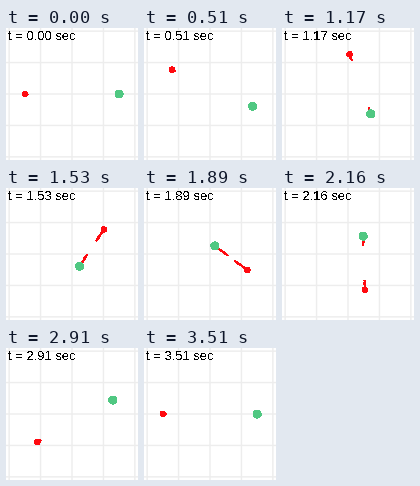
A matplotlib script for the animation above (3540 ms loop, 132 by 132 pixels).

```python
import numpy as np
import matplotlib.pyplot as plt
from matplotlib.animation import FuncAnimation
from matplotlib.patches import Circle, Polygon

SIZE, DPI = 132, 100
PT = 72 / DPI              # points per pixel
UNIT = SIZE / 4.2          # pixels per length unit
STEP, FRAMES = 0.03, 118

# two bodies of mass 1 and 2, started at their greatest distance
GM, START, SPEED = 30.0, 3.0, 2.4
CENTRE = np.array([0.5, 0.0])
AXIS = 1 / (2 / START - SPEED**2 / GM)
ECC = START / AXIS - 1
RATE = np.sqrt(GM / AXIS**3)
FORCE = 0.82
RED, GREEN = "#ff0a10", "#50c882"


def separation(t):
    """Vector from the green body to the red one (Kepler orbit)."""
    mean = RATE * t - np.pi
    ecc_anom = mean
    for _ in range(30):
        ecc_anom -= ((ecc_anom - ECC * np.sin(ecc_anom) - mean)
                     / (1 - ECC * np.cos(ecc_anom)))
    x = AXIS * (np.cos(ecc_anom) - ECC)
    y = AXIS * np.sqrt(1 - ECC**2) * np.sin(ecc_anom)
    return np.array([x, y])


def to_px(p):
    return SIZE / 2 + UNIT * np.asarray(p)


fig = plt.figure(figsize=(SIZE / DPI, SIZE / DPI), dpi=DPI, facecolor="white")
ax = fig.add_axes([0, 0, 1, 1])
ax.set_xlim(0, SIZE)
ax.set_ylim(SIZE, 0)
ax.axis("off")

for k in range(-2, 3):
    style = dict(color="#ededed", lw=1.4 * PT, snap=False, zorder=1)
    ax.axvline(to_px(k), **style)
    ax.axhline(to_px(k), **style)


def make_arrow():
    shaft, = ax.plot([], [], color=RED, lw=PT, antialiased=False, zorder=2)
    head = ax.add_patch(Polygon(np.zeros((3, 2)), fc=RED, lw=0,
                                antialiased=False, zorder=2))
    return shaft, head


def set_arrow(arrow, start, vec):
    shaft, head = arrow
    length = np.hypot(*vec)
    along = vec / length
    side = 1.1 * np.array([-along[1], along[0]])
    tip = start + vec
    base = tip - along * min(4.0, 0.5 * length)
    shaft.set_data(*zip(start, tip))
    head.set_xy([tip, base + side, base - side])


def make_dot(radius, color):
    return ax.add_patch(Circle((0, 0), radius, fc=color, lw=0,
                               antialiased=False, zorder=3))


arrows = [make_arrow(), make_arrow()]
red = make_dot(2.7, RED)
green = make_dot(4.0, GREEN)
clock = ax.text(1.5, 12, "", family="Liberation Sans", size=13 * PT,
                color="black", va="baseline", antialiased=False, zorder=4)


def update(i):
    t = i * STEP
    rel = separation(t)
    p_red = to_px(CENTRE + rel * 2 / 3)
    p_green = to_px(CENTRE - rel / 3)
    dist = np.hypot(*rel)
    pull = UNIT * FORCE * rel / dist**3
    set_arrow(arrows[0], p_red, -pull)
    set_arrow(arrows[1], p_green, pull)
    red.center = p_red
    green.center = p_green
    clock.set_text(f"t = {t:.2f} sec")
    return red, green, clock


anim = FuncAnimation(fig, update, frames=FRAMES, interval=30,
                     repeat=True, repeat_delay=0)
plt.show()
```
